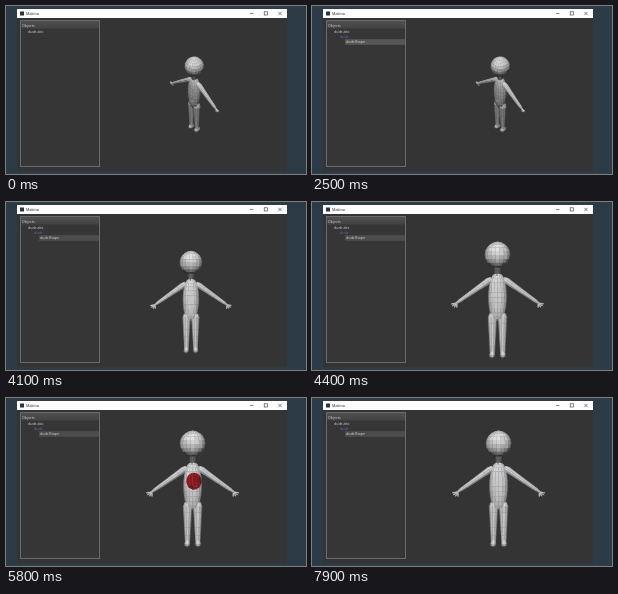
Animation of 300x168 px, one loop 8 s. Source, as an HTML page with a canvas:

```html
<!DOCTYPE html>
<html lang="en">
<head>
<meta charset="utf-8">
<title>Object viewer</title>
<style>
  html, body { margin: 0; width: 100%; height: 100%; overflow: hidden; background: #2d3b46; }
  #stage { position: relative; width: 300px; height: 168px; overflow: hidden; }
  svg, canvas { position: absolute; left: 0; top: 0; width: 300px; height: 168px; }
  text { font: 3.6px "Open Sans", "Noto Sans", sans-serif; fill: #d6d6d6; }
  .node { fill: #6862c4; }
  .title { font-size: 3.8px; fill: #222; }
  .tick { fill: #b4b4b4; }
</style>
</head>
<body>
<div id="stage">
  <svg viewBox="0 0 300 168">
    <defs>
      <linearGradient id="head" x2="0" y2="1">
        <stop stop-color="#505050"/><stop offset="1" stop-color="#424242"/>
      </linearGradient>
    </defs>
    <rect width="300" height="168" fill="#2d3b46"/>
    <rect x="11" y="3" width="270" height="162" fill="#343434"/>
    <rect x="11" y="3" width="270" height="9" fill="#fdfdfd"/>
    <rect x="14" y="5.5" width="4" height="4" fill="#333"/>
    <text class="title" x="20" y="8.9">Makina</text>
    <g fill="none" stroke="#333" stroke-width=".6">
      <path d="M244 7.5h3.4M272.3 5.8l3.4 3.4m0-3.4l-3.4 3.4"/>
      <rect x="258.2" y="5.8" width="3.2" height="3.2"/>
    </g>
    <rect x="14.5" y="14.5" width="79" height="146" fill="#363636" stroke="#6a6a6a"/>
    <rect x="15" y="15" width="78" height="7.5" fill="url(#head)"/>
    <text x="16" y="20.7">Objects</text>
    <rect id="row" x="33" y="33.2" width="60" height="5.6"/>
    <path id="tick1" class="tick"/>
    <path id="tick2" class="tick" d="M22 29.8h3l-1.5 1.8z"/>
    <text x="22" y="27">dude.abc</text>
    <text id="child" class="node" x="28" y="32.3">dude</text>
    <text id="shape" x="34" y="37.3">dudeShape</text>
  </svg>
  <canvas id="view"></canvas>
</div>
<script>
const $ = id => document.getElementById(id);
const LOOP = 8000, canvas = $('view'), g = canvas.getContext('2d');
const dpr = window.devicePixelRatio || 1;
canvas.width = 300 * dpr;
canvas.height = 168 * dpr;

const mix = (a, b, k) => a + (b - a) * k;
const noise = n => { const s = Math.sin(n * 91.7 + 3.1) * 43758.5; return s - Math.floor(s) - .5; };
// Progress 0..1 in n hard steps of 100 ms.
const step = (t, from, n) => Math.max(0, Math.min(1, (Math.floor((t - from) / 100) + 1) / n));

// The model: rings of faces around straight axes, x right, y down, z to the viewer.
const faces = [];
function limb(part, [ax, ay], [bx, by], radius, { rings = 9, sides = 10, depth = 1, rough = 8 } = {}) {
  const dx = bx - ax, dy = by - ay, len = Math.hypot(dx, dy);
  const point = (i, j) => {
    const k = (1 - Math.cos(Math.PI * i / rings)) / 2, a = j / sides * 2 * Math.PI;
    const r = radius(k), u = r * Math.cos(a) / len;
    return [ax + dx * k + dy * u, ay + dy * k - dx * u, r * depth * Math.sin(a)];
  };
  for (let i = 0; i < rings; i++)
    for (let j = 0; j < sides; j++)
      faces.push({
        part, grain: noise(faces.length) * rough,
        corners: [point(i, j), point(i, j + 1), point(i + 1, j + 1), point(i + 1, j)]
      });
}
const taper = (a, b) => k => mix(a, b, k) * Math.min(1, 4 * Math.sqrt(k * (1 - k)));
const round = r => k => 2 * r * Math.sqrt(Math.max(0, k * (1 - k)));

limb('head', [0, -46.4], [0, -20.4], round(12.8), { rings: 10, sides: 18, rough: 20 });
limb('neck', [0, -24], [0, -10], () => 3.4);
limb('torso', [0, -15], [0, 33], k => 9.3 * Math.sin(Math.PI * k) ** .32, { rings: 14, sides: 16, depth: .8 });
for (const s of [-1, 1]) {
  limb('arm', [s * 5, -10], [s * 42, 15.5], taper(3.7, 1.5));
  limb('leg', [s * 5, 24], [s * 5.2, 69], taper(4.9, 2.2));
  limb('foot', [s * 5.2, 63], [s * 5.6, 70.5], round(2.8), { rings: 6, depth: 1.6 });
  for (let i = 0; i < 4; i++) {
    const a = .15 + i * .5;
    limb('finger', [s * 41, 15], [s * (41 + 5.6 * Math.cos(a)), 15 + 4.6 * Math.sin(a)], taper(.9, .6), { rings: 4, sides: 6 });
  }
}

function project(t) {
  const turn = step(t, 3100, 3), pan = step(t, 3800, 2), zoom = step(t, 4100, 2), back = step(t, 4400, 3);
  const yaw = .8 * (1 - turn), pitch = .62 * (1 - turn), scale = mix(.755, 1, zoom);
  const ox = 188.3 - turn - 2.3 * pan + 1.7 * back, oy = 81 + 9 * pan - 10.6 * back;
  const [sy, cy, sp, cp] = [Math.sin(yaw), Math.cos(yaw), Math.sin(pitch), Math.cos(pitch)];
  const place = ([x, y, z]) => {
    const depth = z * cy + x * sy;
    return [ox + scale * (x * cy - z * sy), oy + scale * (y * cp + depth * sp), scale * (depth * cp - y * sp)];
  };
  return faces.map(({ part, grain, corners }) => {
    const p = corners.map(place);
    const [a, b] = [[2, 0], [1, 3]].map(([m, n]) => p[m].map((v, i) => v - p[n][i]));
    const n = [a[1] * b[2] - a[2] * b[1], a[2] * b[0] - a[0] * b[2], a[0] * b[1] - a[1] * b[0]];
    const lit = (-.1 * n[0] - .58 * n[1] + .81 * n[2]) / (Math.hypot(...n) || 1);
    const shade = (55 + 168 * Math.max(0, lit) ** .72 + grain) * (part === 'neck' ? .5 : 1);
    return { part, p, shade, front: n[2] > 0, z: p[0][2] + p[2][2] };
  }).filter(f => f.front).sort((a, b) => a.z - b.z);
}

function paint(list, [r, gr, b]) {
  g.lineWidth = .2;
  for (const { p, shade } of list) {
    g.beginPath();
    p.forEach(([x, y]) => g.lineTo(x, y));
    g.closePath();
    const l = shade / 220;
    g.fillStyle = g.strokeStyle = `rgb(${r * l},${gr * l},${b * l})`;
    g.fill();
    g.stroke();
  }
}

function brush(t, body) {
  if (t < 4800 || t >= 7900) return;
  const k = step(t, 5400, 9), settle = step(t, 6500, 2), grow = mix(.9, 1, step(t, 4900, 1));
  const x = mix(187, 188.7, k) - 1.7 * settle, y = mix(80.3, 85.5, k) - 3.2 * settle;
  const rx = grow * mix(11.5, 4.4, k) - 1.2 * settle, ry = grow * mix(13.5, 4.4, k) - 1.6 * settle;
  if (k) {
    g.fillStyle = 'rgba(190,80,120,.5)';
    for (let i = 0; i < 16; i++) g.fillRect(187 + 13 * noise(i), 83 + 17 * noise(i + 40), .8, .8);
  }
  g.save();
  g.beginPath();
  g.ellipse(x, y, rx, ry, 0, 0, 7);
  g.clip();
  paint(body.filter(f => f.part === 'torso'), [mix(178, 125, k), mix(48, 12, k), mix(28, 42, k)]);
  g.lineWidth = 1;
  g.strokeStyle = 'rgba(50,5,10,.6)';
  g.stroke();
  g.restore();
  if (t >= 7200 && t < 7800) {
    const pull = step(t, 7200, 3);
    g.strokeStyle = '#8c1838';
    g.lineWidth = .7;
    g.beginPath();
    g.moveTo(x, y);
    g.lineTo(x + 32 * pull, y + 16 * pull);
    g.stroke();
  }
}

function tree(t) {
  const show = (id, from, to = LOOP) => $(id).setAttribute('visibility', t >= from && t < to ? 'visible' : 'hidden');
  show('child', 1500);
  show('shape', 2000);
  show('row', 2200);
  show('tick1', 1200, 1700);
  show('tick2', 2000, 2200);
  $('row').setAttribute('fill', t < 2500 ? '#424242' : t < 3100 ? '#565656' : '#4c4c4c');
  $('tick1').setAttribute('d', t < 1500 ? 'M16.5 24.2v2.8l1.9-1.4z' : 'M16 24.6h3l-1.5 1.8z');
}

const start = performance.now();
function frame() {
  const t = (performance.now() - start) % LOOP;
  const body = project(t);
  g.setTransform(dpr, 0, 0, dpr, 0, 0);
  g.clearRect(0, 0, 300, 168);
  tree(t);
  paint(body, [219, 219, 221]);
  brush(t, body);
  requestAnimationFrame(frame);
}
frame();
</script>
</body>
</html>
```
